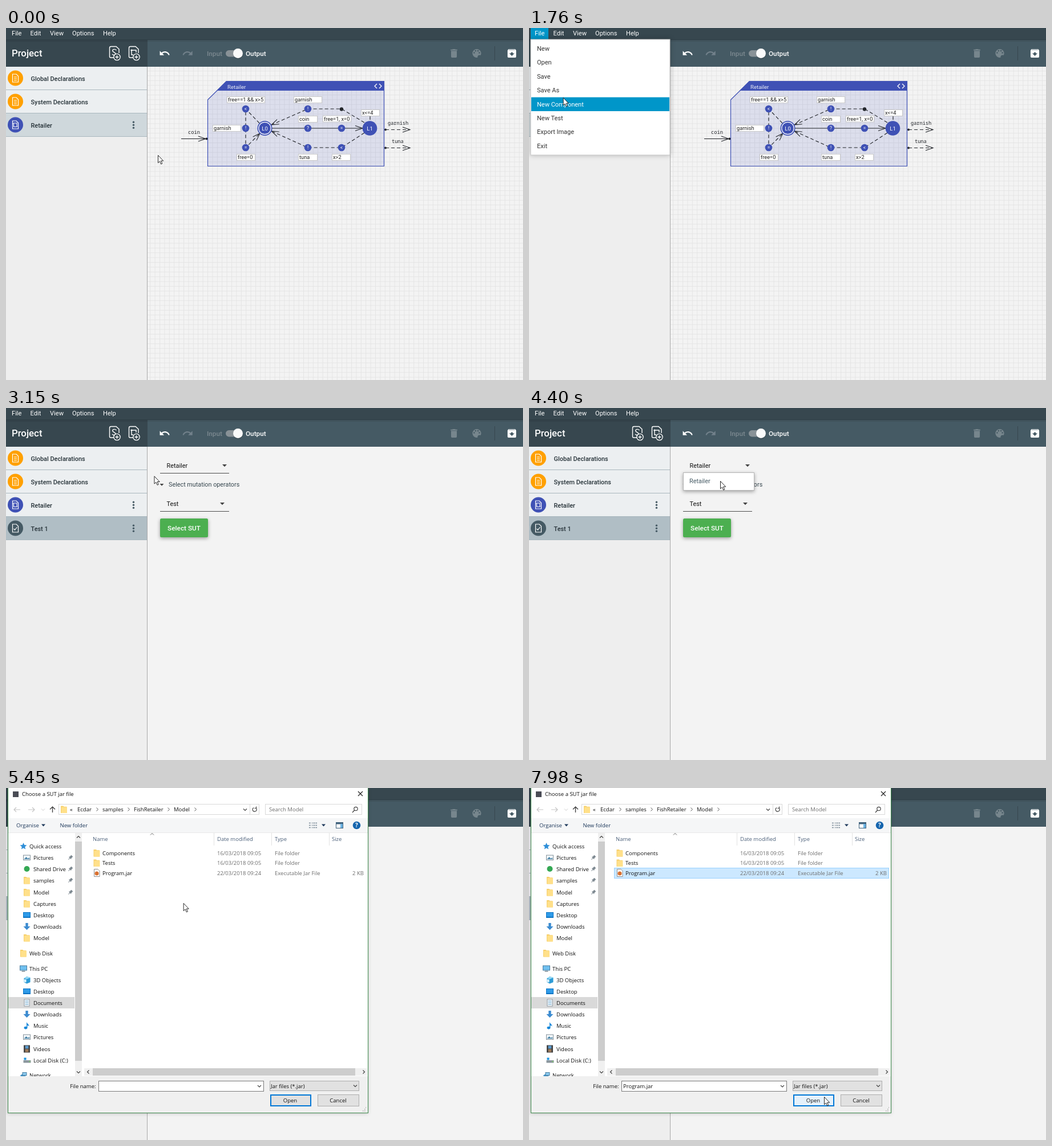
Recreate the animation shown at these times as an HTML page. Size 906 by 618 pixels, loop 8000 ms.

```html
<!DOCTYPE html>
<html lang="en">
<head>
<meta charset="utf-8">
<title>Selecting a jar file</title>
<style>
html, body { margin: 0; width: 100%; height: 100%; overflow: hidden; background: #f3f3f3; }
svg { display: block; width: 906px; height: 618px; }
text { white-space: pre; }
.ui { font-family: Roboto, sans-serif; }
.win { font-family: "Open Sans", "Noto Sans", sans-serif; }
.mono { font-family: "Noto Sans Mono", "DejaVu Sans Mono", monospace; }
</style>
</head>
<body>
<svg id="stage" viewBox="0 0 906 618" xmlns="http://www.w3.org/2000/svg"></svg>
<script>
const LOOP = 8000;

// Markup helpers
const text = (x, y, s, size, fill, cls = 'ui', extra = '') =>
  `<text x="${x}" y="${y}" font-size="${size}" fill="${fill}" class="${cls}" ${extra}>${s.replace(/&/g, '&amp;').replace(/</g, '&lt;')}</text>`;
const rect = (x, y, w, h, fill, extra = '') =>
  `<rect x="${x}" y="${y}" width="${w}" height="${h}" fill="${fill}" ${extra}/>`;
const box = (x, y, w, h, fill, stroke, extra = '') =>
  rect(x + .5, y + .5, w - 1, h - 1, fill, `stroke="${stroke}" ${extra}`);
const path = (d, fill, extra = '') => `<path d="${d}" fill="${fill}" ${extra}/>`;
const line = (d, stroke, w = 1, extra = '') => path(d, 'none', `stroke="${stroke}" stroke-width="${w}" ${extra}`);
const circle = (x, y, r, fill, extra = '') => `<circle cx="${x}" cy="${y}" r="${r}" fill="${fill}" ${extra}/>`;
const group = (id, body, extra = '') => `<g id="${id}" ${extra}>${body}</g>`;
const at = (x, y, body, scale = 1) => `<g transform="translate(${x} ${y}) scale(${scale})">${body}</g>`;
const icon = (x, y, d, fill) => at(x - 10.1, y - 10.1, path(d, fill), .84);
const MEDIUM = 'font-weight="500" ';
const MIDDLE = 'text-anchor="middle"';
const INDIGO = '#3f51b5';

// Application frame
function frameMarkup() {
  const undo = 'M12.5 8c-2.65 0-5.05 1-6.9 2.6L2 7v9h9l-3.62-3.62c1.39-1.16 3.16-1.88 5.12-1.88 3.54 0 6.55 2.31 7.6 5.5l2.37-.78C21.08 11 17.15 8 12.5 8z';
  const trash = 'M6 19a2 2 0 0 0 2 2h8a2 2 0 0 0 2-2V7H6zM19 4h-3.5l-1-1h-5l-1 1H5v2h14z';
  const archive = 'M20.5 5.2l-1.4-1.7A1.5 1.5 0 0 0 18 3H6a1.5 1.5 0 0 0-1.2.5L3.5 5.2A2 2 0 0 0 3 6.5V19a2 2 0 0 0 2 2h14a2 2 0 0 0 2-2V6.5a2 2 0 0 0-.5-1.3zM12 17.5L6.5 12H10v-2h4v2h3.5zM5.1 5l.8-1h12l1 1z';
  const paint = circle(0, 0, 7.6, '#77868d') + circle(5, 6.5, 3.6, '#455a64') +
    [[-4.6, -1], [-2.1, -4.4], [2.1, -4.4], [4.6, -1]].map(p => circle(...p, 1.3, '#455a64')).join('');
  const addDoc = (x, inner) => at(x, 44, line('M3.5 8H-6.5Q-8.5 8-8.5 6V-9Q-8.5-11.5-6-11.5H3L8-7V0', '#fff', 1.4) + inner +
    circle(4.5, 7, 5.7, '#37474f', 'stroke="#fff" stroke-width="1.3"') + line('M1.5 7H7.5M4.5 4V10', '#fff', 1.3));
  const menus = [['File', 10], ['Edit', 42.5], ['View', 77], ['Options', 116], ['Help', 170]];
  return rect(0, 0, 906, 68, '#37474f') + rect(248, 21, 658, 47, '#455a64') +
    rect(0, 20, 906, 1, '#2f3e45') + rect(0, 21, 906, 3, '#000', 'opacity=".08"') +
    group('fileHot', rect(3, 0, 31, 20, '#0096c9')) +
    menus.map(([s, x]) => text(x, 13, s, 11.1, '#fff')).join('') +
    text(10, 50, 'Project', 16.8, '#fff', 'ui', MEDIUM) +
    addDoc(190, line('M3.5-5Q0-8-3-5.5C-5-1 3-2 2 2Q-1 5-4 2', '#fff', 1.4)) +
    addDoc(224, line('M-4-5H4V-1M-4-6V3H-1', '#fff', 1.4) + circle(-4, -5, 1.6, '#fff')) +
    icon(278, 44.5, undo, '#fff') +
    `<g transform="translate(328.4 34.4) scale(-.84 .84)">${path(undo, '#71808a')}</g>` +
    text(352, 48.5, 'Input', 11.76, '#7c8990', 'ui', MEDIUM) +
    rect(385, 39, 25, 11.5, '#899297', 'rx="5.7"') + circle(406.5, 45.3, 8.6, '#000', 'opacity=".25"') + circle(406.5, 44.5, 8.5, '#fafafa') +
    text(420, 48.5, 'Output', 11.76, '#fff', 'ui', MEDIUM) +
    icon(785, 44.5, trash, '#77868d') + at(825, 44.5, paint) +
    line('M856.5 32V57', '#37474f') + icon(886.5, 44.5, archive, '#fff');
}

function sidebarMarkup() {
  const page = line('M-4.5-7H2L5.5-3.5V7H-4.5Z', '#fff', 1.2);
  const lines = line('M-2-2H3M-2 1H3M-2 4H3', '#fff', 1.1);
  const sheet = line('M-2.5-1.5V-3H3V2.5M3 3.5H-2.5V-1M-2.5-3L-3.8-1.5M3 3.5L4 2', '#fff', 1.1);
  const item = (y, s, colour, inner, id, dots) =>
    rect(0, y, 247, 40, '#eceff1', `id="${id}"`) + rect(0, y + 40, 247, 1, '#a9b7be') +
    circle(16.5, y + 20, 13.5, colour) + at(16, y + 20, page + inner) +
    text(43.5, y + 24.5, s, 10.9, '#263238', 'ui', MEDIUM) +
    (dots ? [-5, 0, 5].map(d => circle(223.5, y + 20.2 + d, 1.7, '#455a64')).join('') : '');
  return rect(0, 68, 247, 550, '#eee') +
    item(68, 'Global Declarations', '#ffa000', lines, 'rowGlobal') +
    item(109, 'System Declarations', '#ffa000', lines, 'rowSystem') +
    item(150, 'Retailer', INDIGO, sheet, 'rowRetailer', true) +
    group('testRow', item(191, 'Test 1', '#455a64', line('M-2.5 1L-.5 3L3.5-2', '#fff', 1.2), 'rowTest', true)) +
    rect(247, 68, 1, 550, '#aaa');
}

// Component diagram
function diagramMarkup() {
  const ink = '#23262b', dash = 'stroke-dasharray="6 4"';
  const edge = (d, dashed) => line(d, ink, 1.15, dashed ? dash : '');
  const head = (x, y, angle) => `<g transform="translate(${x} ${y}) rotate(${angle})">${line('M-13-4.5L0 0L-13 4.5', ink, 1.1)}</g>`;
  const nail = (x, y, s) => circle(x, y, 6.3, INDIGO) + text(x, y + 3, s, 8.4, '#fff', 'ui', MIDDLE);
  const label = (x, y, w, s) => box(x, y, w, 12, '#fff', '#c8c8c8') + text(x + 2, y + 9.3, s, 9.25, '#222');
  const grid = `<pattern id="grid" x="353" y="243" width="8.4" height="8.4" patternUnits="userSpaceOnUse">${line('M.5 0V8.4M0 .5H8.4', '#e4e4e4', .9)}</pattern>`;
  return `<defs>${grid}</defs>` + rect(248, 68, 658, 550, 'url(#grid)') +
    path('M353 126L386 93H663V243H353Z', INDIGO, 'opacity=".13"') +
    path('M369 110L386 93H663V110Z', INDIGO) +
    line('M353.5 126L386.5 93.5H662.5V242.5H353.5Z', INDIGO, 1.2) +
    text(388, 107, 'Retailer', 9.6, '#e8eaf6') +
    line('M650 98L646 102L650 106M654 98L658 102L654 106', '#fff', 1.3) +
    edge('M444 167L420 142V210L444 186', true) + head(445, 185, -45) +
    edge('M628 166L588 142H529L465 170', true) + head(465, 170, 156) +
    edge('M628 184L588 210H529L465 181', true) + head(465, 181, 204) +
    edge('M466 176H625') + head(625, 176, 0) + edge('M638 155V163', true) +
    circle(588, 142.5, 3.2, ink) +
    circle(453.5, 176, 13, INDIGO) + circle(453.5, 176, 10.7, 'none', 'stroke="#fff" stroke-width="1.2"') +
    text(453.5, 179.5, 'L0', 9.4, '#fff', 'ui', MIDDLE) +
    circle(637.5, 176, 12.8, INDIGO) + text(637.5, 179.5, 'L1', 9.4, '#fff', 'ui', MIDDLE) +
    [[420, 142, '<'], [420, 176, '!'], [420, 210, '='], [529, 142, '!'], [529, 176, '?'], [588, 176, '='], [529, 210, '!'], [588, 210, '<']].map(n => nail(...n)).join('') +
    [[387, 120, 67, 'free==1 && x>5'], [504, 120, 50, 'garnish'], [512, 154, 34, 'coin'], [555, 153.5, 50, 'free=1, x=0'], [362, 170, 50, 'garnish'],
      [404, 221, 33, 'free=0'], [512, 221, 34, 'tuna'], [571, 221, 33, 'x>2'], [622, 143, 33, 'x<=4']].map(l => label(...l)).join('') +
    edge('M307 194.5H351') + head(350, 194.5, 0) + circle(351.5, 194.5, 1.9, ink) + text(319, 186, 'coin', 8.7, ink, 'mono') +
    edge('M665 178.5H708', true) + head(708, 178.5, 0) + circle(665, 178.5, 1.9, ink) + text(669, 170, 'garnish', 8.6, ink, 'mono') +
    edge('M665 210.5H708', true) + head(708, 210.5, 0) + circle(665, 210.5, 1.9, ink) + text(676, 202, 'tuna', 8.6, ink, 'mono');
}

// Test plan page
function testMarkup() {
  const arrow = (x, y) => path(`M${x - 4} ${y - 2}H${x + 4}L${x} ${y + 2.2}Z`, '#444');
  return text(281.5, 104.8, 'Retailer', 10.9, '#111') + arrow(383, 101) + rect(270, 114, 121, 1, '#4d4d4d') +
    rect(270, 113, 125, 2, '#4059a9', 'id="focusLine"') +
    path('M269.5 133H276.5L273 136.8Z', '#444') + text(285, 138.3, 'Select mutation operators', 10.8, '#37474f') +
    text(281.5, 172, 'Test', 10.9, '#111') + arrow(379, 168) + rect(270, 181, 121, 1, '#4d4d4d') +
    rect(270, 194, 84, 33, '#4caf50', 'rx="2.5" style="filter:drop-shadow(0 2px 3px rgba(0,0,0,.35))"') +
    text(312, 214.5, 'Select SUT', 11.8, '#fff', 'ui', MEDIUM + MIDDLE) +
    group('popup', box(270, 113, 125, 32, '#fff', '#b5b5b5', 'style="filter:drop-shadow(0 2px 3px rgba(0,0,0,.35))"') +
      text(281, 132.3, 'Retailer', 10.9, '#455a64'));
}

const MENU = ['New', 'Open', 'Save', 'Save As', 'New Component', 'New Test', 'Export Image', 'Exit'];
const MENU_ROW = 24.4;
function menuMarkup() {
  return rect(3, 20, 244, 203, '#fff', 'stroke="#c8c8c8" style="filter:drop-shadow(0 0 4px rgba(0,0,0,.25))"') +
    rect(4, 24, 242, MENU_ROW, '#0096c9', 'id="menuHot"') +
    MENU.map((s, i) => text(14, 40 + i * MENU_ROW, s, 11, '#333', 'ui', `id="menu${i}"`)).join('');
}

// File chooser
const glyphs = {
  folder: path('M-5.5-6H-1L0-4.8H5V6.5H-5.5Z', '#f6cf6a') + rect(-4.5, -4, 10, 10.5, '#ffe08a'),
  star: path('M0-6L1.7-2L6-1.6L2.7 1.2L3.7 5.5L0 3.2L-3.7 5.5L-2.7 1.2L-6-1.6L-1.7-2Z', '#2f8fd8'),
  picture: box(-6.5, -4.5, 13, 9.5, '#f3f8fb', '#83919a') + path('M-5 3L-1-1L2 2L4 0L5 3Z', '#4a84a8'),
  drive: circle(0, 0, 5, '#34a853'),
  desktop: rect(-6.5, -5, 13, 10, '#0b74c4') + rect(-5.5, -4, 11, 7, '#2f9be8'),
  down: path('M-2.2-6H2.2V0H6L0 6.2L-6 0H-2.2Z', '#3c8bd0'),
  pc: box(-6.5, -5.5, 13, 9, '#6fc0f0', '#4b7ea0') + rect(-3, 4, 6, 1.5, '#7b8a94'),
  cube: path('M-5-3L0-6L6-4V4L0 6.5L-5 4Z', '#2d9bd6') + path('M-5-3L0-1.5L6-4L1-6Z', '#9adcf5') + rect(-5, -1, 4, 5, '#d8f1fb'),
  doc: box(-5, -6.5, 10, 13, '#fff', '#8a98a2') + line('M-3-3H3M-3 0H3M-3 3H3', '#4f95c5', 1.2),
  music: path('M-.5-6.5C0-3 4-3 4 1.5C2.5-.5 1.5-.5 1 0V4A3 2.4 0 1 1-.5 2Z', '#1687d9'),
  film: rect(-5.5, -6.5, 11, 13, '#444') + rect(-2.8, -5.5, 5.6, 5, '#5b9bd0') + rect(-2.8, .5, 5.6, 5, '#9e7b5a'),
  disk: rect(-6, 0, 13, 4.5, '#8c979e') + rect(-5, -4.5, 4, 4, '#2498e0') + circle(5, 2.2, 1, '#7bdc5c'),
  net: path('M-6 1L0-3L6 0L0 4Z', '#3b8fc6') + box(-2, -5, 8, 6, '#8ac9ee', '#4b7ea0'),
  file: path('M-4.5-6.5H2L5-3.5V6.5H-4.5Z', '#fff', 'stroke="#8e8e8e"')
};
glyphs.jar = glyphs.file + circle(0, 1, 3.5, '#d9702f');

const chevron = (x, y, dir, colour = '#444', w = 1.2) => {
  const turn = { right: 0, down: 90, left: 180, up: 270 }[dir];
  return `<g transform="translate(${x} ${y}) rotate(${turn})">${line('M-1.5-3L1.5 0L-1.5 3', colour, w)}</g>`;
};
const win = (x, mid, s, fill = '#111', extra = '') => text(x, mid + 3.5, s, 9.5, fill, 'win', extra);

function navMarkup() {
  const rows = [[102, 'star', 'Quick access', 0], [122, 'picture', 'Pictures', 1], [142, 'drive', 'Shared Drive', 1], [162, 'folder', 'samples', 1],
    [183, 'folder', 'Model', 1], [203, 'folder', 'Captures', 1], [223, 'desktop', 'Desktop', 1], [243, 'down', 'Downloads', 1], [263, 'folder', 'Model', 1],
    [290, 'folder', 'Web Disk', 0], [317, 'pc', 'This PC', 0], [337, 'cube', '3D Objects', 1], [357, 'desktop', 'Desktop', 1], [377, 'doc', 'Documents', 1],
    [397, 'down', 'Downloads', 1], [417, 'music', 'Music', 1], [437, 'picture', 'Pictures', 1], [458, 'film', 'Videos', 1], [478, 'disk', 'Local Disk (C:)', 1], [504, 'net', 'Network', 0]];
  const pin = y => `<g transform="translate(113 ${y}) rotate(45)">${path('M-2-4H2V0L3 1.5H-3L-2 0Z', '#7f8a92')}${line('M0 1V5', '#7f8a92')}</g>`;
  return '<clipPath id="navClip"><rect x="4" y="79" width="117" height="427"/></clipPath><g clip-path="url(#navClip)">' +
    rect(4, 367, 116, 20, '#d9d9d9') +
    rows.map(([y, g, s, deep]) => at(30.5 + deep * 6, y, glyphs[g]) + win(41 + deep * 7, y, s)).join('') +
    [122, 142, 162, 183].map(pin).join('') + '</g>' +
    rect(121, 79, 12, 427, '#f0f0f0') + rect(121, 94, 12, 385, '#cdcdcd') + chevron(127, 86, 'up') + chevron(127, 499, 'down');
}

function dialogMarkup() {
  const slate = '#4c607a', grey = '#6d6d6d';
  const backArrow = line('M11 0H0M4-4L0 0L4 4', '#c5c5c5', 1.2);
  const crumbs = [['Ecdar', 125, 160], ['samples', 169, 215], ['FishRetailer', 224, 285], ['Model', 294, 332]];
  const blankFields = rect(162, 514, 290, 19, '#fff') + rect(462, 514, 157, 18, '#fff') + rect(463, 538, 72, 21, '#fff') + rect(546, 538, 73, 21, '#fff');
  const ready =
    at(14, 38, backArrow) + at(50, 38, `<g transform="scale(-1 1)">${backArrow}</g>`) + chevron(65, 38, 'down', '#ccc', 1) +
    line('M81.5 43V33M77 37.5L81.5 33L86 37.5', '#444', 1.4) +
    box(92, 28, 352, 19, '#fff', '#d9d9d9') + at(101.5, 37.5, glyphs.folder) + win(112, 37, '«') +
    crumbs.map(([s, x, c]) => win(x, 37, s) + chevron(c, 37.5, 'right', '#555', 1)).join('') +
    chevron(419, 38, 'down') + line('M427.5 29V46', '#d9d9d9') + line('M438 35A3.6 3.6 0 1 1 434 34.6M438.5 32.5V35.5H435.5', '#444', 1.2) +
    box(454, 28, 170, 19, '#fff', '#d9d9d9') + win(461, 37.5, 'Search Model', grey) +
    circle(613, 36.5, 3.2, 'none', 'stroke="#444" stroke-width="1.2"') + line('M610.7 39L607 43', '#444', 1.3) +
    win(18, 65, 'Organise', '#1e395b') + path('M62 63.5H69L65.5 67.5Z', '#1e395b') + win(94.5, 65, 'New folder', '#1e395b') +
    line('M531 61.5H535M531 65.5H535M531 69.5H535M537 61.5H545M537 65.5H545M537 69.5H545', '#6b7d8a', 1.6, 'stroke-dasharray="2 1"') +
    path('M553 63.5H560L556.5 67.5Z', '#1e395b') +
    box(162, 514, 290, 19, '#fff', '#7a7a7a') + chevron(444, 523.5, 'down') +
    group('fileName', win(165, 523.5, 'Program.jar')) +
    box(462, 514, 157, 18, '#e1e1e1', '#adadad') + win(464, 523, 'Jar files (*.jar)') + chevron(612, 523, 'down') +
    rect(464, 539, 70, 19, '#e1e1e1', 'id="open" stroke="#0078d7" stroke-width="2"') + win(498, 548.5, 'Open', '#111', MIDDLE) +
    box(546, 538, 73, 21, '#e1e1e1', '#adadad') + win(582, 548.5, 'Cancel', '#111', MIDDLE) +
    line('M625 567H631M628 564H631M630 561H631', '#aaa', 1.5, 'stroke-dasharray="1.5 1.5"');
  const entry = (y, g, s, date, type) => (g ? at(159, y, glyphs[g]) : '') + win(169, y, s) + win(370, y, date, grey) + win(471, y, type, grey);
  return rect(3, -3, 631, 573, '#fff', 'style="filter:drop-shadow(0 1px 3px rgba(0,0,0,.25))"') +
    rect(3, 53, 631, 25, '#f5f6f7') + rect(3, 78, 631, 1, '#e8e8e8') + rect(3, 506, 631, 64, '#f0f0f0') +
    group('pending', rect(3, -3, 631, 68, '#dadada') + rect(3, 65, 631, 14, '#fff') + blankFields) +
    rect(12, 6, 10, 10, '#4a4c55') + win(28, 10.5, 'Choose a SUT jar file') +
    line('M617 6L625 14M625 6L617 14', '#222', 1.2) +
    box(578, 60, 13, 11, '#fff', '#40627c') + rect(579, 61, 11, 2.5, '#40627c') + rect(586, 63, 4, 7, '#6bb2e2') +
    circle(614.5, 65.5, 6.8, '#1565ae') + text(614.5, 69, '?', 10, '#fff', 'win', MIDDLE + ' font-weight="700"') +
    navMarkup() +
    win(152, 89.5, 'Name', slate) + win(370, 89.5, 'Date modified', slate) + win(471, 89.5, 'Type', slate) + win(571, 89.5, 'Size', slate) +
    line('M364.5 79V101M465.5 79V101M566.5 79V101', '#e2e2e2') + chevron(256, 81, 'up', '#666', 1) +
    box(149, 140, 482, 19, '#cce8ff', '#99d1ff', 'id="rowHot"') +
    entry(114, 'folder', 'Components', '16/03/2018 09:05', 'File folder') +
    entry(131.5, 'folder', 'Tests', '16/03/2018 09:05', 'File folder') +
    at(159, 149, group('plainFile', glyphs.file) + group('jarFile', glyphs.jar)) +
    entry(149, '', 'Program.jar', '22/03/2018 09:24', 'Executable Jar File') + win(627, 149, '2 KB', grey, 'text-anchor="end"') +
    rect(137, 492, 496, 13, '#f0f0f0') + rect(152, 492, 460, 13, '#cdcdcd') + chevron(144, 498.5, 'left') + chevron(627, 498.5, 'right') +
    win(157.5, 523.5, 'File name:', '#111', 'text-anchor="end"') +
    group('ready', ready) + box(3, -3, 632, 574, 'none', '#3f8a4d');
}

const cursorMarkup =
  group('arrow', path('M.5 .5V13.8L3.5 11L5.7 16L7.8 15L5.6 10.2H9.7Z', '#fff', 'stroke="#111" stroke-width=".9"')) +
  group('hand', path('M-1.5 11V1.5Q0-.5 1.5 1.5V6.5Q3.5 5.5 4.3 7Q6 6.2 6.7 7.8Q9 7.5 9 9.5V13Q8.5 15.5 7.3 18H0Q-1 15-4 11.5Q-5 9.5-3.5 9.2Q-3 8.8-1.5 11Z', '#fff', 'stroke="#111"'));

const stage = document.getElementById('stage');
stage.innerHTML = rect(0, 0, 906, 618, '#f3f3f3') +
  group('diagram', diagramMarkup()) + group('testPage', testMarkup()) + frameMarkup() + sidebarMarkup() +
  group('menu', menuMarkup()) + group('dialog', dialogMarkup()) + group('cursor', cursorMarkup);

const el = id => document.getElementById(id);
const show = (id, on) => el(id).setAttribute('display', on ? 'inline' : 'none');
const set = (id, name, value) => el(id).setAttribute(name, value);
const clamp = u => Math.max(0, Math.min(1, u));
const ramp = (t, from, to) => clamp((t - from) / (to - from));
const smooth = u => u * u * (3 - 2 * u);
const speedUp = u => u ** 1.6;
const slowDown = u => 1 - (1 - u) ** 1.7;

// Pointer stops: time, x, y, easing used to arrive
const stops = [[50, 266, 223], [840, 15, 12], [1200, 15, 12], [1990, 71, 150], [2640, 71, 150], [3430, 335, 107], [3840, 335, 107],
  [4200, 335, 128], [4400, 335, 128], [5100, 312, 203], [5400, 312, 203], [5990, 248, 151], [6240, 248, 151],
  [6850, 363, 266, speedUp], [7650, 517, 537, slowDown], [7900, 517, 542]];

function pointer(t) {
  const i = stops.findIndex(s => s[0] > t);
  if (i === 0) return stops[0].slice(1);
  if (i < 0) return stops[stops.length - 1].slice(1);
  const a = stops[i - 1], b = stops[i];
  const u = (b[3] || smooth)(ramp(t, a[0], b[0]));
  return [a[1] + (b[1] - a[1]) * u, a[2] + (b[2] - a[2]) * u];
}

function render(t) {
  const [x, y] = pointer(t);
  set('cursor', 'transform', `translate(${x.toFixed(2)} ${y.toFixed(2)})`);
  const hand = t >= 870 && t < 2000 && y < 20;
  show('hand', hand);
  show('arrow', !hand);

  const testing = t >= 2700;
  show('fileHot', t < 2700 && (t > 800 || (y < 20 && x < 34)));
  show('menu', t >= 1240 && t < 2640);
  const hot = y > 24 ? Math.min(MENU.length - 1, Math.floor((y - 24) / MENU_ROW)) : -1;
  show('menuHot', hot >= 0);
  set('menuHot', 'y', 24 + Math.max(0, hot) * MENU_ROW);
  MENU.forEach((_, i) => set('menu' + i, 'fill', i === hot ? '#fff' : '#333'));

  show('diagram', !testing);
  show('testPage', testing);
  show('testRow', testing);
  set('rowRetailer', 'fill', testing ? '#eceff1' : '#cfd8dc');
  set('rowTest', 'fill', '#b0bec5');

  const focus = ramp(t, 3420, 3560);
  show('focusLine', t >= 3440 && t < 4480);
  set('focusLine', 'width', 125 * focus);
  set('focusLine', 'x', 270 + 62.5 * (1 - focus));
  show('popup', t >= 3840 && t < 4520);
  set('popup', 'opacity', ramp(t, 3820, 4000) * (1 - ramp(t, 4440, 4520)));

  // The dialog fades in while growing to full size
  const p = ramp(t, 5150, 5350), scale = 1 - .095 * (1 - p) ** 2;
  show('dialog', p > 0);
  set('dialog', 'opacity', clamp(p * 1.31));
  set('dialog', 'transform', `translate(318.5 285) scale(${scale}) translate(-318.5 -285)`);
  const loaded = t >= 5400;
  show('pending', !loaded);
  show('ready', loaded);
  show('plainFile', !loaded);
  show('jarFile', loaded);

  const selected = t >= 6080;
  show('rowHot', selected || (loaded && y < 159));
  set('rowHot', 'fill', selected ? '#cce8ff' : '#e5f3ff');
  set('rowHot', 'stroke', selected ? '#99d1ff' : '#e5f3ff');
  show('fileName', t >= 6120);
  const h = ramp(t, 7680, 7900);
  set('open', 'fill', `rgb(${225 + 4 * h},${225 + 16 * h},${225 + 26 * h})`);
}

function tick(now) {
  render(now % LOOP);
  requestAnimationFrame(tick);
}
render(0);
requestAnimationFrame(tick);
</script>
</body>
</html>
```
